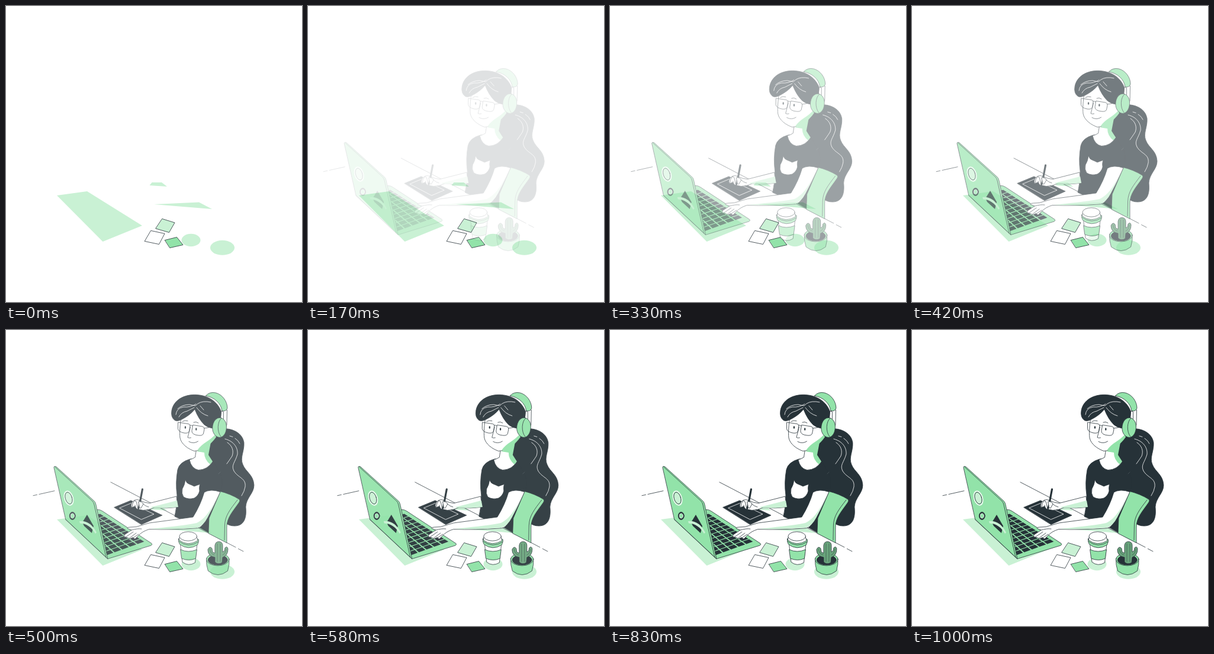
An HTML page that plays this animation: 500 by 500 pixels, repeating every 1040 ms.

```html
<!DOCTYPE html>
<html lang="en">
<head>
<meta charset="utf-8">
<title>Designer at her desk</title>
<style>
  html, body { margin: 0; width: 100%; height: 100%; overflow: hidden; background: #fff }
  svg { display: block; width: 100vw; height: 100vh }
  path, ellipse { stroke: #263238; stroke-width: .8; stroke-linejoin: round; stroke-linecap: round; fill: none }
  .d { fill: #263238 }
  .g { fill: #92e3a9 }
  .p { fill: #c9f1d4 }
  .w { fill: #fff }
  .c { fill: #69a57c }
  .n { stroke: none }
  .l { stroke: #fff }
</style>
</head>
<body>
<svg viewBox="0 0 500 500">
  <!-- shadows and paper squares -->
  <path class="p n" d="M86 320L137 313 230 371 163.500 398Z"/>
  <path class="p n" d="M242.500 303L246.500 298H263L272 305Z"/>
  <path class="p n" d="M250 335L326 331.500 348 343Z"/>
  <ellipse class="p n" cx="312.500" cy="395.500" rx="16" ry="10.700"/>
  <ellipse class="p n" cx="365.500" cy="408.300" rx="20.500" ry="12.500"/>
  <path class="p" d="M264 359.500L285 366 275.500 382.500 253 376Z"/>
  <path class="w" d="M245 379.500L268 384.500 258.500 402.500 234.500 397.500Z"/>
  <path class="g" d="M268.500 395.500L288.500 390.500 299 403.500 277 408.500Z"/>

  <g id="scene">
    <!-- desk edge -->
    <path d="M52 279.700L58.500 278.300M62 277.500L88 271.700M183 257L394 367M398.500 369.500L407 374"/>

    <!-- ponytail, chair -->
    <path class="d" d="M362 168C382 163 405 171 408 190C409 205 401 215 406 227C411 240 424 244 425 262C425 276 412 283 411 299C413 318 408 331 392 331Q382 331 376 325L350 270 346 212 352 180Z"/>
    <path class="l" d="M376 184C392 188 398 200 397 210C393 224 386 228 391 238C398 250 412 250 410 265Q409 272 404 280M384 179L389 180.500M393 183Q399 187 401 192M380 190C389 196 391 205 388 213Q382 222 379 226"/>
    <path class="g" d="M366 272Q386 277 400 286Q402 288 400 291C389 307 379 317 379 333V359.500L348 343.500 346 320Z"/>
    <path d="M397 287C384 304 376 314 375.500 330L375 355"/>

    <!-- shirt and neck -->
    <path class="d" d="M317 218Q299 223 296 236Q292 258 295 279Q295 299 291 315L334 334 348 342 349 318 368 273Q374 262 369 245L354 218Z"/>
    <path class="w" d="M328 199L325.500 215Q321 218 316 219Q319 234 331 236.500Q347 236 355 222L347 212 349 190Z"/>
    <path class="g n" d="M328 205Q342 201 352 190L348 211 355 222 351 227Q341 219 341 207Z"/>
    <path class="w" d="M309 253Q311 259 315 260Q320 262 324 264Q329 262 333.500 260.500Q332 267 333 272Q331 280 324 284Q314 287 306 282Q302 276 304 268Q308 262 309 253Z"/>
    <path d="M365 243L368 240" stroke="#65716f" style="stroke:#5c686d;stroke-width:.5"/>

    <!-- head -->
    <path class="w" d="M302 148C300 160 299 173 300 182C302 193 314 201 324 204.500C336 204 350 194 359 180L364 150 326 130Z"/>
    <path class="g n" d="M360 176C350 188 338 190 329 203.500C341 203 352 193 361 181Z"/>
    <path class="d" d="M325 134Q317 144 303 151Q296 155 291 152.500Q284 147 286 136C289 119 306 108 329 109.500C350 111 366 123 371 142Q374 155 366 166L355 166Q347 165 341 160Q331 150 325 134Z"/>
    <path class="l" d="M293 143Q294 132 306 130Q318 131 327 125M298 147Q302 139 312 137L324 131M296 133Q304 126 316 126L326 128Q333 120 346 121L352 122M328 131Q336 142 347 145M334 128L340 135"/>

    <!-- face and glasses -->
    <path d="M297 156L314 158.500Q317 159 317 162L315.500 171Q314 175 307 174Q297 172 296.500 167ZM322 160.500L338 163Q341.500 164 341 168L339.500 175Q338 179 331 178Q320 177 320 171ZM317 161Q319 160 321 162M341 166L356 163.500"/>
    <path d="M304 154.500Q308 152 313 153.500M323 156Q327 154 331 157M317.500 164L313 181.500Q315 183 318.500 182M315 188.500Q323 193 330.500 188"/>
    <ellipse class="d n" cx="309" cy="164.500" rx="1.200" ry="2.200"/>
    <ellipse class="d n" cx="327.300" cy="167.500" rx="1.200" ry="2.200"/>

    <!-- headphones -->
    <path class="w" d="M372 134L379.500 135 379 160Q377 167 370 168Z"/>
    <path class="g" d="M343.500 111Q350 104 360 106C372 109 380 121 380 132Q378 138 371 136.500C369 124 359 114 343.500 111Z"/>
    <path class="w" d="M370 137L373.500 138V162L368 160Z"/>
    <path class="g" d="M367 148C376 149 380 158 378 169C376 179 369 184 362 180C356 176 353 168 356 158Q359 149 367 148Z"/>
    <path d="M370 149C363 154 362 172 369 180"/>

    <!-- tablet and drawing hand -->
    <path class="d" d="M189 299.500L217 288 270 313 235 328.500Z"/>
    <path class="l" d="M198 300.500L217.500 292.500 256 311 235 320Z"/>
    <path class="w" d="M249 292.500L294 281 296 299Q278 302 257 300Q248 304 238 304.500L230 303 226 297 218 300Q216 296 219 291Q223 286 228 286.500L240 291Z"/>
    <path class="p n" d="M252 299Q276 293 295 288L297 299Q272 302 252 300Z"/>
    <path d="M236.500 269L231 298 229 303" style="stroke-width:3.200"/>
    <path class="w" d="M219 299Q219 293 223 288Q227 289 227 293L229 303Q225 302 224 296M230 290Q236 289 238 294L234 301Q231 301 231 297Z"/>
    <path d="M238 294Q242 298 247 299"/>

    <!-- laptop -->
    <path class="g" d="M107 320L160 303.500Q165 303 169 306L252 360.500Q254 362.500 251 364L178 386.500Z"/>
    <g id="keys"></g>
    <path class="g" d="M87 232Q87 229 91 231L154 288Q157 290 158 295L178 386.500 107 320Z"/>
    <path d="M89 231.500L152 289Q154 291 155 295L175 384"/>
    <g transform="rotate(-17 112 284)">
      <ellipse class="l" cx="112" cy="284" rx="7" ry="12" style="stroke:#e9f9ee;stroke-width:2"/>
      <ellipse class="p" cx="112" cy="284" rx="5.600" ry="10.200"/>
    </g>
    <ellipse class="d" cx="118.300" cy="314" rx="5" ry="6.500"/>
    <ellipse class="g" cx="118.300" cy="314" rx="3" ry="4" style="stroke:#e9f9ee"/>
    <path class="d n" d="M135 325L143 312 154 331 151 343 138 331Z"/>
    <path class="p n" d="M130 323Q148 321 159 342L157 344Q147 327 131 326.500Z"/>

    <!-- typing arm -->
    <path class="w" d="M341 274Q352 268 368 273.500C360 291 349 316 338 329Q334 335 326 335Q285 338 248 336.500Q236 340 229 348L224 353 220 350.500 215 353 212 351 208 350Q204 349 206 346L218 338 211 335Q211 333 216 333L226 332.500 248 326 322 316Q335 295 341 274Z"/>
    <path class="p n" d="M366 276C352 304 344 318 328 326C304 331 275 333 250 336Q290 337 328 334Q339 332 347 316Z"/>
    <path d="M208 350L221 341M214 352L226 343M221 351L230 345M218 338Q228 335 235 336"/>
    <path class="d n" d="M341 274Q352 267 368 273L363 262H336L330 284Z"/>

    <!-- coffee cup -->
    <path class="w" d="M300.500 361L304 392Q314 400 325.500 393L329 361Z"/>
    <path class="g" d="M301 371Q314 377 328.500 371L326.500 386Q315 391 303 386Z"/>
    <path class="g" d="M297.500 353Q297 358 299.500 362Q314 373 329.500 363Q332 358 331.500 354Q314 342 297.500 353Z"/>
    <path class="w" d="M299 350L298.500 355Q313 366 330 356L328.500 350Z"/>
    <ellipse class="w" cx="313.800" cy="348.500" rx="14.800" ry="7.700"/>
    <path d="M298 357Q314 369 331 358"/>

    <!-- cactus -->
    <path class="g" d="M344.500 386Q344 397 347.500 407Q364 420 380.500 407Q384 396 383 386Z"/>
    <ellipse class="g" cx="363.800" cy="387.500" rx="19.300" ry="10.500"/>
    <ellipse class="d" cx="363.800" cy="388.500" rx="16.500" ry="8.500"/>
    <path class="c" d="M359 392V384Q347 382 347 371Q350 364 354 369L355 375 359 377V364Q360 357 366 357.500Q372 358 372 364V375L375 373 376 368Q380 364 381 370Q381 381 372 384L371 393Q364 397 359 392Z"/>
    <path d="M363 361L363 391M368 361V391M350.500 370Q351 378 358 380M378 370Q377 378 372 380" style="stroke-width:.5"/>
  </g>
</svg>
<script>
const scene = document.getElementById('scene');
const LOOP = 1040, STEP = LOOP / 25, SLIDE = 30;

// Keyboard: a grid stretched over a four-cornered plane.
const corners = [[119, 323], [165, 310], [176, 381], [241, 357.5]];
const onKeys = (u, v) => [0, 1].map(k =>
  (1 - u) * ((1 - v) * corners[0][k] + v * corners[1][k]) +
  u * ((1 - v) * corners[2][k] + v * corners[3][k])).join(' ');
const cols = 10, rows = 5, gap = .08;
let d = '';
for (let i = 0; i < cols; i++) for (let j = 0; j < rows; j++) {
  const at = (a, b) => onKeys((i + a) / cols, (j + b) / rows);
  d += `M${at(gap, gap)}L${at(1 - gap, gap)} ${at(1 - gap, 1 - gap)} ${at(gap, 1 - gap)}Z`;
}
document.getElementById('keys').innerHTML = `<path class="d n" d="${d}"/>`;

// cubic-bezier(.36, -.01, .5, 1.38)
const curve = (s, a, b) => 3 * (1 - s) ** 2 * s * a + 3 * (1 - s) * s * s * b + s ** 3;
function ease(x) {
  if (x >= 1) return 1;
  let lo = 0, hi = 1;
  for (let i = 0; i < 30; i++) {
    const mid = (lo + hi) / 2;
    if (curve(mid, .36, .5) < x) lo = mid; else hi = mid;
  }
  return curve(lo, -.01, 1.38);
}

function draw(now) {
  const step = Math.floor((now % LOOP + 3) / STEP);
  const p = step < 2 ? 0 : ease((step * STEP + 30) / 1000);
  scene.setAttribute('opacity', Math.min(1, p));
  scene.setAttribute('transform', `translate(${SLIDE * (p - 1)} 0)`);
}
const start = performance.now();
function tick() {
  draw(performance.now() - start);
  requestAnimationFrame(tick);
}
tick();
</script>
</body>
</html>
```
